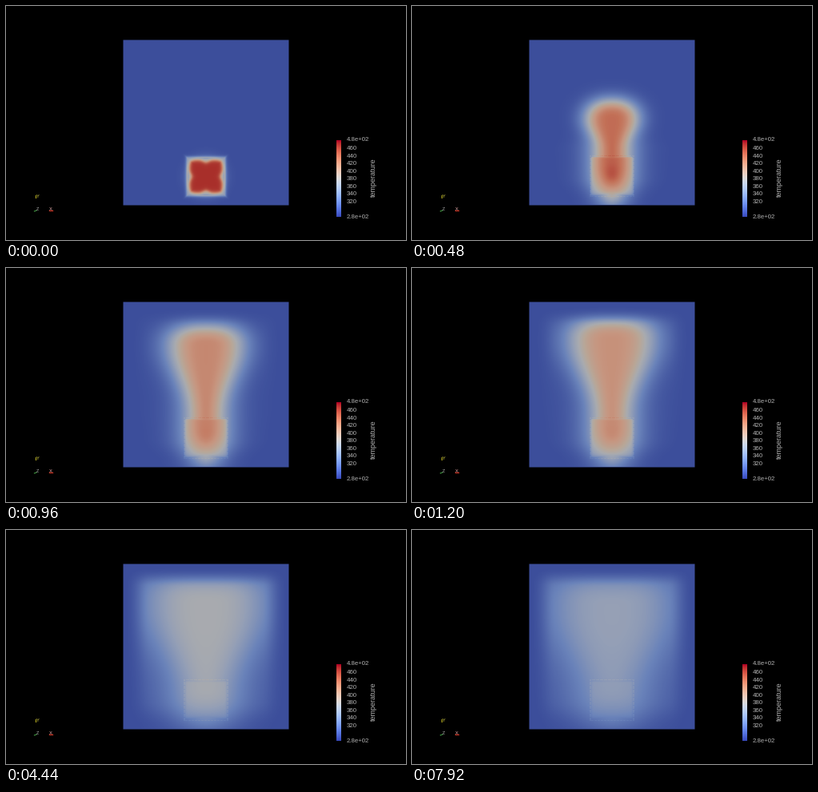
A matplotlib script for the animation above (8 s loop, 500x293 px).

```python
import numpy as np
import matplotlib.pyplot as plt
from matplotlib.animation import FuncAnimation
from matplotlib.colors import LinearSegmentedColormap
from matplotlib.patches import Rectangle

W, H, DPI = 500, 293, 100
TICK, STEP, LOOP = 40, 120, 8000
LEFT, RIGHT, TOP, BOTTOM = 147, 353, 43, 249
CX, BOX_TOP, BOX_BOTTOM, BOX_HALF = 250, 187.5, 238.5, 27
COLD = "#3c4e9b"

plt.rcParams["font.family"] = "Liberation Sans"

plate_map = LinearSegmentedColormap.from_list("plate", [
    (0, COLD), (.25, "#6a83ba"), (.4, "#949fb6"), (.48, "#a9abaf"),
    (.55, "#b8a798"), (.65, "#c79680"), (.78, "#c37158"), (1, "#a52624")])

x, y = np.meshgrid(np.arange(LEFT, RIGHT) + .5, np.arange(TOP, BOTTOM) + .5)
dx, dy = np.abs(x - CX), np.abs(y - 213.5)


def smooth(v):
    v = np.clip(v, 0, 1)
    return v * v * (3 - 2 * v)


def sigmoid(v):
    return 1 / (1 + np.exp(-np.clip(v, -40, 40)))


def falloff(r, p):
    """Bell curve that is 1 at the centre and 1/2 at r = 1."""
    return .5 ** (r ** p)


def grow(t, tau, p=1.5):
    return 1 - np.exp(-(t / tau) ** p)


def start_field():
    """Hot square with a four-lobed core and a pale rim."""
    far, near = np.maximum(dx, dy), np.minimum(dx, dy)
    edge = 20.5 - 2.6 * np.exp(-(near / 5.5) ** 2) - 3 * (near / 20) ** 6
    rim = .45 * sigmoid(24.6 - far)
    core = .52 * sigmoid((edge - far) / 1.4)
    halo = .13 * np.exp(-np.maximum(np.hypot(dx, dy) - 24, 0) / 5)
    return np.clip(rim + core + halo * (far > 23), 0, 1)


START = start_field()
inside = sigmoid((BOX_HALF + .5 - dx) / .8) * sigmoid((y - BOX_TOP) / .8) \
    * sigmoid((BOX_BOTTOM - y) / 1.5)
cold_walls = smooth(np.minimum(x - LEFT, RIGHT - x) / 32) \
    * smooth((y - TOP - 2) / 26)
floor_loss = 1 - .65 * np.clip((y - 200) / 50, 0, 1) ** 2
hot_spot = np.exp(-(dx / 9) ** 2 - ((y - 212) / 12) ** 2)
in_x, in_y = dx < BOX_HALF + 1, (y > BOX_TOP - 1) & (y < BOX_BOTTOM + 1)
outline = ((np.abs(y - BOX_TOP) < .6) & in_x & (x % 5 < 4)) \
    | ((np.abs(dx - BOX_HALF) < .6) & in_y & (y % 5 < 4)) \
    | ((np.abs(y - BOX_BOTTOM) < .6) & in_x & (x % 4 < 3))


def plume(t):
    # The head rises, meets the top wall, then spreads and cools.
    heat = .95 / (1 + t / 900) ** .43
    belly = 80 + 123 * (1 - grow(t, 590, 1.6)) + 20 * grow(t, 3500, 1)
    cap = 22 + 18 * grow(t, 2500, 1)
    head = 23 + 52 * grow(t, 1300, 1.6)
    waist = 22 + 28 * grow(t, 3000)
    corner = 2 + grow(t, 1500)
    waist_y = max(belly + 1, 176 + 36 * grow(t, 2400))

    fall = 1 - smooth((y - belly) / (waist_y - belly))
    half = waist + (head - waist) * fall ** 1.3
    half = half * (1 - .2 * smooth((y - 215) / 30))
    above = np.maximum(belly - y, 0) / cap
    r = ((dx / half) ** corner + above ** corner) ** (1 / corner)
    u = heat * falloff(r, 1.8 + 1.1 * fall)

    box = 1.04 * heat * falloff(dx / (28 + 40 * grow(t, 3000)), 2.2)
    u = np.maximum(u, box * inside) * floor_loss
    u = u + .2 * np.exp(-t / 450) * hot_spot
    haze = .08 * grow(t, 3000) * (1 - smooth((y - 110) / 140))
    return (u + haze * (1 - u)) * cold_walls


def field(t):
    k = smooth(t / 260)
    return (1 - k) * START + k * (plume(t) + .04 * outline)


fig = plt.figure(figsize=(W / DPI, H / DPI), dpi=DPI, facecolor="black")
ax = fig.add_axes([0, 0, 1, 1])
ax.axis("off")


def label(px, py, s, size, color="#b0b0b0", **kw):
    kw = {"ha": "left", "va": "center_baseline", **kw}
    ax.text(px, py, s, fontsize=size * 72 / DPI, color=color, **kw)


ax.add_patch(Rectangle((LEFT - .5, TOP - .5), RIGHT - LEFT + 1,
                       BOTTOM - TOP + 1, fc=COLD, lw=0, snap=False, zorder=-1))
plate = ax.imshow(field(0), cmap=plate_map, vmin=0, vmax=1, aspect="auto",
                  extent=(LEFT, RIGHT, BOTTOM, TOP), interpolation="nearest")
ax.imshow(np.linspace(1, 0, 96)[:, None], cmap="coolwarm", aspect="auto",
          extent=(413, 419, 264, 168), interpolation="nearest")
ax.set(xlim=(0, W), ylim=(H, 0))

label(426, 166.5, "4.8e+02", 7.8)
label(426, 263, "2.8e+02", 7.8)
for value in range(320, 461, 20):
    label(426, 263.5 - (value - 280) * .4775, str(value), 7.9)
label(459.5, 214.5, "temperature", 9, rotation=90, ha="center", va="center")

# Orientation axes
ax.plot([36.5, 36.5], [237, 240], color="#b8b020", lw=.8)
label(38, 238.5, "Y", 5.5, "#e2dc50")
ax.plot([35.5, 38], [257, 256], color="#3c8a3c", lw=.9)
label(37.5, 254.3, "Z", 5.5, "#b4b4b4")
ax.plot([53.5, 57.5], [255.5, 255.5], color="#c03020", lw=1)
label(53.5, 254, "X", 5.8, "#eeb0b0")


def update(i):
    t = i * TICK // STEP * STEP
    plate.set_data(field(t))
    return [plate]


anim = FuncAnimation(fig, update, frames=LOOP // TICK, interval=TICK,
                     repeat=True, repeat_delay=0)
plt.show()
```
